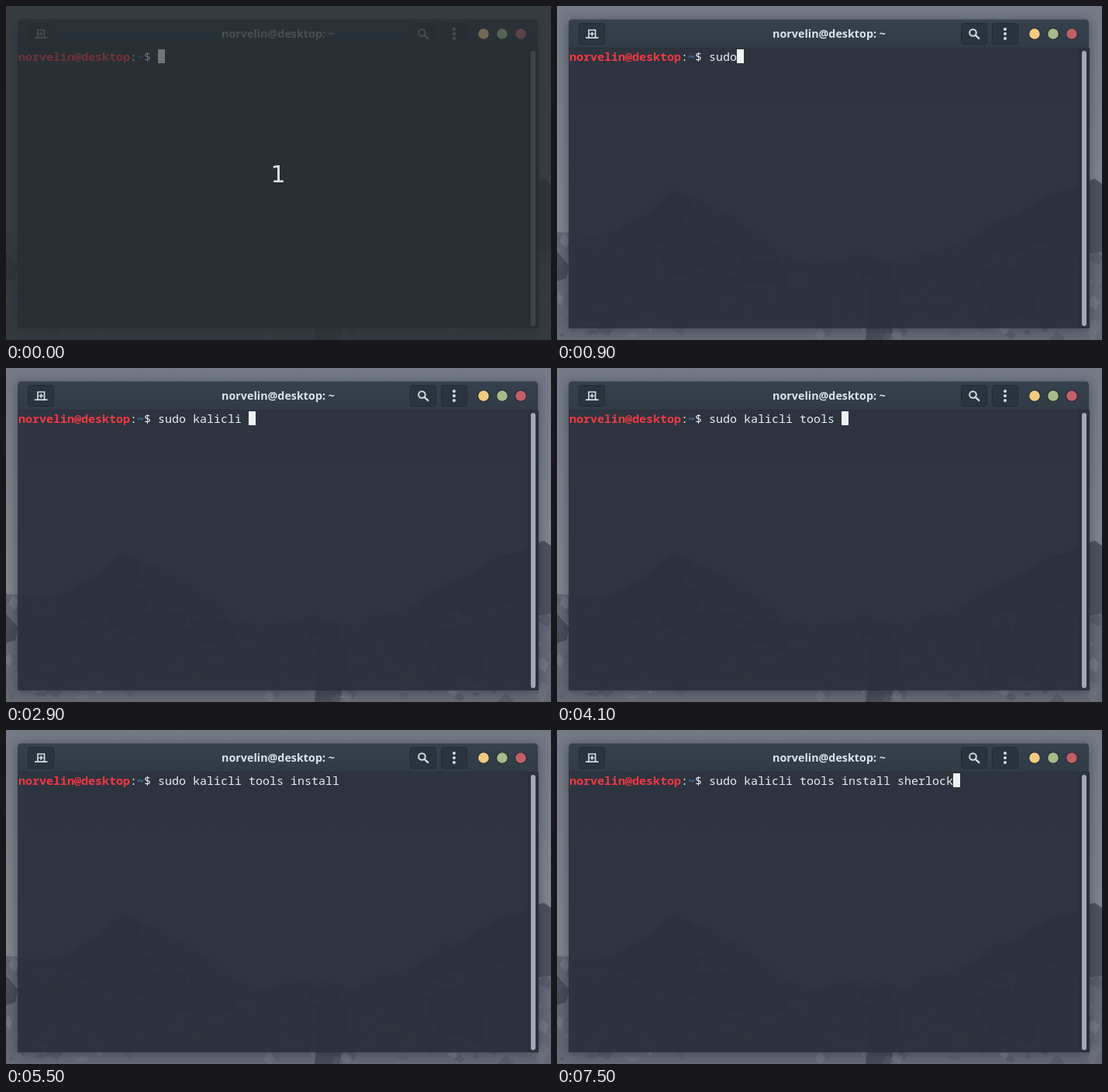
An HTML page for the animation above (8 s loop, 703 px wide and 432 px high).

```html
<!DOCTYPE html>
<html lang="en">
<head>
<meta charset="utf-8">
<title>Terminal</title>
<style>
  html, body { margin: 0; width: 100%; height: 100%; overflow: hidden; background: #757b86; }
  svg { display: block; }
  .title { font: bold 14.3px "Open Sans", "Noto Sans", sans-serif; fill: #dde3ea; text-anchor: middle; }
  .line { font: 15px "Noto Sans Mono", "DejaVu Sans Mono", monospace; fill: #e9edf0; white-space: pre; }
  .user { font-weight: bold; fill: #f43842; }
  .path { font-weight: bold; fill: #4b80b8; }
  .count { font: 30px "DejaVu Sans", sans-serif; fill: #dfe6e9; text-anchor: middle; }
  .button { fill: #2b343e; stroke: #222a33; }
  .icon { fill: none; stroke: #d5dbe2; }
  .dots { fill: #d5dbe2; }
  .controls { stroke: #252d35; stroke-width: 1.2; }
  .veil { display: none; }
  .intro .veil { display: inline; }
  .intro .bright { opacity: .36; }
</style>
</head>
<body>
<svg id="stage" class="intro" width="703" height="432" viewBox="0 0 703 432">
  <defs>
    <linearGradient id="sky" x2="0" y2="1">
      <stop offset="0" stop-color="#747a86"/>
      <stop offset=".65" stop-color="#80858f"/>
      <stop offset="1" stop-color="#7b808b"/>
    </linearGradient>
    <linearGradient id="bar" x2="0" y2="1">
      <stop offset="0" stop-color="#35414c"/>
      <stop offset="1" stop-color="#303b46"/>
    </linearGradient>
    <filter id="soft" x="-10%" y="-10%" width="120%" height="120%">
      <feGaussianBlur stdDeviation="7"/>
    </filter>
    <clipPath id="land">
      <path id="ridge" d="M0 292L20 294 48 297 76 291 98 276 120 266 138 247 150 238 163 243 178 250 193 254 208 267 228 271 240 284 262 297 278 311 300 325 330 334 360 329 398 320 425 329 452 334 472 319 500 316 528 303 550 287 566 276 592 271 614 256 638 241 662 239 682 226 694 223 703 230V432H0Z"/>
    </clipPath>
  </defs>

  <rect width="703" height="432" fill="url(#sky)"/>
  <use href="#ridge" fill="#646975"/>
  <g clip-path="url(#land)">
    <path fill="#4c515d" d="M64 298L120 268 150 240 176 252 164 278 190 296 176 316 214 308 252 330 286 326 306 372 262 356 226 366 192 338 150 352 128 318 96 326Z"/>
    <path fill="#4c515d" d="M530 305L590 272 640 242 694 224 703 230V318L676 322 640 300 606 322 580 312 548 326Z"/>
    <path fill="#474c58" d="M386 336L426 330 444 372 430 432H398L404 380ZM540 346L580 330 612 362 622 414 584 396 560 404ZM0 318L16 336 12 352 0 356Z"/>
    <g id="rocks"></g>
  </g>

  <rect x="13" y="18" width="675" height="401" rx="6" fill="#1b2029" opacity=".42" filter="url(#soft)"/>
  <rect x="15" y="55" width="671" height="362" fill="#2a303b" opacity=".87"/>
  <path d="M15 55V22a5 5 0 0 1 5-5H681a5 5 0 0 1 5 5V55Z" fill="url(#bar)"/>
  <path d="M19 17.5H682" stroke="#46525c"/>
  <path d="M15 54.5H686" stroke="#293139"/>

  <rect x="674" y="55" width="12" height="362" fill="#2b323c"/>
  <path d="M673.5 55V417M686.5 55V417" stroke="#272d37"/>
  <rect x="677" y="58" width="6" height="356" rx="3" fill="#a0a9b5"/>

  <g class="button">
    <rect x="28.5" y="22.5" width="33" height="27" rx="3"/>
    <rect x="521.5" y="22.5" width="33" height="27" rx="3"/>
    <rect x="561.5" y="22.5" width="33" height="27" rx="3"/>
  </g>
  <path class="icon" stroke-width="1.7" d="M37 41.2H41V31H49.5V41.2H53.5M41 41.2H49.5M42.5 36H48M45.25 33.2V38.8"/>
  <g class="icon" stroke-width="2">
    <circle cx="536.5" cy="34.5" r="4.3"/>
    <path d="M539.8 37.8L545 42.6" stroke-width="2.4"/>
  </g>
  <g class="dots">
    <circle cx="578" cy="30" r="2"/>
    <circle cx="578" cy="36" r="2"/>
    <circle cx="578" cy="42" r="2"/>
  </g>
  <text class="title" x="351" y="41">norvelin@desktop: ~</text>

  <rect class="veil" width="703" height="432" fill="#272e33" opacity=".81"/>

  <g class="controls bright">
    <circle cx="616" cy="36" r="7.4" fill="#f1cb83"/>
    <circle cx="640" cy="36" r="7.4" fill="#a4bc88"/>
    <circle cx="664" cy="36" r="7.4" fill="#c15f68"/>
  </g>
  <g class="bright">
    <text class="line" x="16" y="71"><tspan class="user">norvelin@desktop</tspan>:<tspan class="path">~</tspan>$ <tspan id="typed"></tspan></text>
    <rect id="cursor" x="196" y="56" width="9" height="18" fill="#eef2f2"/>
  </g>
  <text class="veil count" x="351" y="228">1</text>
</svg>
<script>
  const LOOP = 8000, TICK = 100, CELL = 9, LEFT = 196;
  const COMMAND = "sudo kalicli tools install sherlock";
  // Tick at which each character of the command appears.
  const KEYS = [
    5, 6, 7, 9, 10,
    12, 14, 16, 17, 19, 21, 22, 29,
    31, 32, 34, 36, 39, 41,
    42, 44, 45, 46, 47, 48, 50, 60,
    62, 65, 66, 68, 70, 72, 74, 75
  ];
  const BLINKS = [[4, 5], [55, 59]];

  const byId = id => document.getElementById(id);
  const stage = byId("stage"), typed = byId("typed"), cursor = byId("cursor");

  function scatterRocks() {
    let seed = 17;
    const rand = () => (seed = seed * 16807 % 2147483647) / 2147483647;
    const shades = ["#4f5460", "#5a5f6b", "#737884", "#7e838e"];
    let shapes = "";
    for (let i = 0; i < 150; i++) {
      const x = rand() * 720 - 10, y = 300 + rand() * 132;
      const w = 6 + rand() * 16, h = 3 + rand() * 9;
      const fill = shades[Math.floor(rand() * shades.length)];
      shapes += `<path fill="${fill}" opacity=".55" d="M${x} ${y}l${w * .5} ${-h} ${w * .5} ${h * .8} ${-w * .3} ${h}z"/>`;
    }
    byId("rocks").innerHTML = shapes;
  }

  function draw(ms) {
    const tick = Math.floor(ms % LOOP / TICK);
    const count = KEYS.filter(key => key <= tick).length;
    const hidden = BLINKS.some(([off, on]) => tick >= off && tick < on);
    stage.classList.toggle("intro", tick < 1);
    typed.textContent = COMMAND.slice(0, count);
    cursor.setAttribute("x", LEFT + count * CELL);
    cursor.setAttribute("visibility", hidden ? "hidden" : "visible");
  }

  scatterRocks();
  const start = performance.now();
  function play() {
    draw(performance.now() - start);
    requestAnimationFrame(play);
  }
  play();
</script>
</body>
</html>
```
